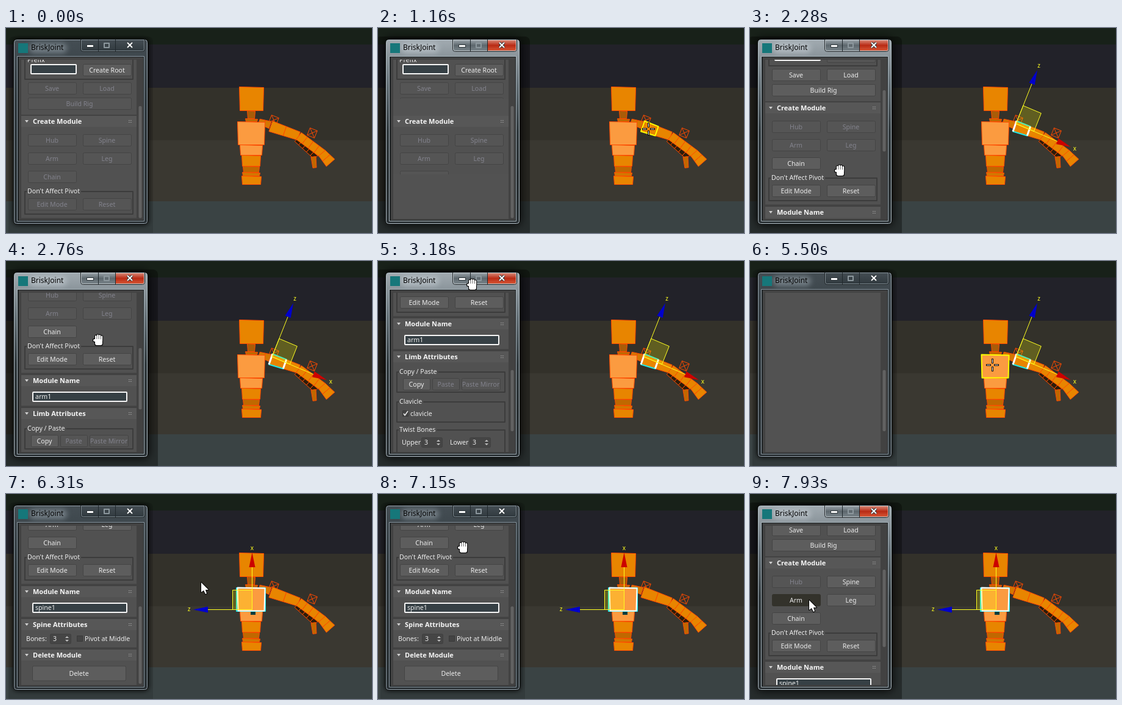
An HTML page with a canvas for the animation above (8 s loop, 600 by 336 pixels).

```html
<!DOCTYPE html>
<html lang="en">
<head>
<meta charset="utf-8">
<title>Rig panel</title>
<style>
html, body { margin: 0; width: 100%; height: 100%; overflow: hidden; background: #182119; }
canvas { display: block; width: 600px; height: 336px; }
</style>
</head>
<body>
<canvas id="stage" width="600" height="336"></canvas>
<script>
const ctx = document.getElementById('stage').getContext('2d');
const LOOP = 8000, STEP = 60;
const FONT = '"Noto Sans", "Open Sans", sans-serif';

// Drawing helpers
function rect(x, y, w, h, fill) { ctx.fillStyle = fill; ctx.fillRect(x, y, w, h); }
function frame(x, y, w, h, color, width = 1) {
  ctx.strokeStyle = color; ctx.lineWidth = width;
  ctx.strokeRect(x + width / 2, y + width / 2, w - width, h - width);
}
function round(x, y, w, h, r, fill, stroke) {
  ctx.beginPath(); ctx.roundRect(x, y, w, h, r);
  if (fill) { ctx.fillStyle = fill; ctx.fill(); }
  if (stroke) { ctx.strokeStyle = stroke; ctx.lineWidth = 1; ctx.stroke(); }
}
function text(s, x, y, color = '#ececec', align = 'left', style = '10.6px') {
  ctx.font = `${style} ${FONT}`; ctx.textAlign = align; ctx.textBaseline = 'middle';
  ctx.fillStyle = color; ctx.fillText(s, x, y);
}
function path(points, closed = true) {
  const p = new Path2D();
  points.forEach(([x, y]) => p.lineTo(x, y));
  if (closed) p.closePath();
  return p;
}
function paint(p, fill, stroke, width = 1) {
  if (fill) { ctx.fillStyle = fill; ctx.fill(p); }
  if (stroke) { ctx.strokeStyle = stroke; ctx.lineWidth = width; ctx.stroke(p); }
}
const line = (a, b, color, width) => paint(path([a, b], false), null, color, width);
const triangle = (x, y, w, h, color) => paint(path([[x - w, y], [x + w, y], [x, y + h]]), color);
function gradient(y0, y1, ...colors) {
  const g = ctx.createLinearGradient(0, y0, 0, y1);
  colors.forEach((c, i) => g.addColorStop(i / (colors.length - 1), c));
  return g;
}
const mix = (a, b, k) => a.map((v, i) => v + (b[i] - v) * k);
const along = ([x, y], [dx, dy], d) => [x + dx * d, y + dy * d];
function unit(a, b) {
  const d = Math.hypot(b[0] - a[0], b[1] - a[1]);
  return [(b[0] - a[0]) / d, (b[1] - a[1]) / d];
}

// Pointer strokes: start, end, destination; the pointer rests in between
const strokes = [
  [60, 480, 405, 115], [480, 840, 443, 165], [1480, 2160, 146, 259], [2160, 3180, 154, 38],
  [3560, 4340, 495, 225], [4720, 5500, 397, 170], [5950, 7150, 139, 87], [7150, 7570, 142, 211],
  [7630, 7930, 97, 174]
];
function pointerAt(t) {
  let pos = [516, 234];
  for (const [start, end, ...goal] of strokes) {
    if (t < start) break;
    const passed = t >= end ? end - start : Math.floor((t - start) / STEP) * STEP;
    pos = mix(pos, goal, passed / (end - start));
  }
  return pos;
}

// Character: a stack of blocks and a chain of tapered limbs
const ORANGE = '#e88500', LIGHT = '#fb9b40', DARK = '#c06800', SHADE = '#2c1c0a', LINE = '#ff4a00';
const parts = [];
const addPart = (name, fill, corners) => parts.push({ name, fill, corners, shape: path(corners) });

function limb(name, from, to, startWidth, endWidth, count, fill) {
  const [dx, dy] = unit(from, to), normal = [dy, -dx];
  const edge = k => {
    const p = mix(from, to, k), w = startWidth + (endWidth - startWidth) * k;
    return [along(p, normal, w), along(p, normal, -w)];
  };
  for (let i = 0; i < count; i++) {
    const [a, b] = edge(i / count), [c, d] = edge((i + 1) / count);
    addPart(name + i, fill, [a, c, d, b]);
  }
}
limb('clavicle', [415, 153], [433, 159], 4, 6, 2, '#d47700');
limb('under', [476, 183], [508, 212], 4, 4, 5, SHADE);
limb('thumb', [504, 211], [506, 229], 4, 3, 1, DARK);
limb('upper', [434, 161], [480, 177], 9, 7, 2, ORANGE);
limb('fore', [480, 177], [519, 206], 7, 7, 4, ORANGE);
limb('hand', [518, 205], [532, 221], 7, 9, 2, ORANGE);

let blockTop = 96.5;
for (const [name, w, h, fill] of [
  ['head', 40, 39, ORANGE], ['neck', 13, 13, '#a95c08'], ['collar', 20, 5, DARK],
  ['chest', 45, 38, LIGHT], ['waist', 37, 17, LIGHT], ['hips', 31, 18, ORANGE],
  ['pelvis', 27, 10, DARK], ['seat', 29, 6, '#d47700'], ['base', 32, 14, ORANGE]
]) {
  const left = Math.round(401.5 - w / 2) + .5, right = left + w, bottom = blockTop + h;
  addPart(name, fill, [[left, blockTop], [right, blockTop + 1], [right - 1, bottom], [left + 1, bottom]]);
  blockTop = bottom;
}
const partNamed = name => parts.find(p => p.name === name);

function gimbal(x, y) {
  const corners = [0, 1, 2, 3].map(i => along([x, y], [Math.cos(i * 1.57 - .4), Math.sin(i * 1.57 - .4)], 9));
  corners.forEach((a, i) => corners.slice(i + 1).forEach(b => line(a, b, LINE)));
}
function drawFigure(hovered) {
  ctx.lineJoin = 'round';
  gimbal(439, 151); gimbal(502, 172);
  parts.forEach(p => paint(p.shape, p.fill, LINE));
  if (hovered) paint(hovered.shape, null, '#ffff00', 2);
}

// Transform gizmo
const YELLOW = '#ffff20';
function gizmo(origin, xTip, zTip) {
  const u = unit(origin, xTip), v = unit(origin, zTip), size = 32;
  const a = along(origin, u, size), b = along(origin, v, size);
  paint(path([origin, a, along(a, v, size), b]), 'rgba(255,255,0,.22)', YELLOW);
  for (const [name, tip, dir, color] of [['x', xTip, u, '#cc0000'], ['z', zTip, v, '#0000cc']]) {
    const base = along(tip, dir, -24), normal = [-dir[1], dir[0]];
    line(origin, base, YELLOW);
    paint(path([along(base, normal, 5), tip, along(base, normal, -5)]), color);
    text(name, ...along(tip, dir, 7), YELLOW, 'center', '10px');
  }
}
function drawSelection(kind) {
  if (kind === 'arm') {
    const { shape, corners: [a, b, c, d] } = partNamed('upper0');
    paint(shape, null, '#20e8e8', 2);
    line(a, d, '#fff', 3); line(b, c, '#fff', 3);
    gizmo([436, 157], [526, 195], [471, 69]);
  } else {
    frame(377, 153, 49, 40, '#20e8e8', 2);
    paint(partNamed('chest').shape, null, '#fff', 2);
    rect(401, 193, 8, 5, '#063c3c');
    gizmo([403.5, 189.5], [403.5, 96], [307, 189.5]);
  }
}

// Panel widgets; y is the vertical centre of a row
const PANEL = '#515151';
const MODULES = ['Hub', 'Spine', 'Arm', 'Leg', 'Chain'];
function isEnabled(label, kind) {
  if (label.startsWith('Paste')) return false;
  if (label === 'Create Root') return kind === 'none';
  if (kind === 'none') return false;
  const i = MODULES.indexOf(label);
  return i < 0 || label === 'Chain' || (kind === 'spine' && i > 0);
}
function button(label, x, y, w, state, h = 20) {
  const on = isEnabled(label, state.kind), pressed = label === 'Arm' && state.overArm;
  round(x + .5, y - h / 2 + .5, w - 1, h - 1, 2,
    pressed ? '#33322b' : on ? '#5d5d5d' : '#555', pressed ? '#33322b' : '#444');
  text(label, x + w / 2 - .5, y + .5, on ? '#ececec' : '#83838d', 'center');
}
function buttonGrid(labels, y, state) {
  labels.forEach((label, i) => button(label, 36 + i % 2 * 90, y + (i >> 1) * 30, 80, state));
}
function rollout(title, top, height) {
  rect(25, top, 189, height, PANEL);
  rect(25, top, 189, 18, '#575757');
  rect(25, top + height - 1, 189, 1, '#474747');
  triangle(34, top + 7, 3, 4, '#d0d0d0');
  text(title, 44, top + 9.5, '#f6f6f6', 'left', 'bold 11px');
  for (let i = 0; i < 6; i++) rect(201 + i % 3 * 2, top + 7 + (i > 2) * 3, 1, 1, '#aaa');
}
function group(label, top, height) {
  frame(30, top, 179, height, '#3c3c3c', 2);
  ctx.font = `10.6px ${FONT}`;
  rect(34, top - 4, ctx.measureText(label).width + 3, 8, PANEL);
  text(label, 35, top + .5);
}
function field(x, y, w, value) {
  round(x, y - 8, w, 17, 2, '#f4f4f4');
  rect(x + 2, y - 6, w - 4, 13, '#364045');
  text(value, x + 5, y + .5);
}
function spinner(label, x, y, gap) {
  text(label, x, y + .5);
  round(x + gap + .5, y - 7.5, 34, 16, 2, '#454545', '#404040');
  text('3', x + gap + 5, y + .5);
  triangle(x + gap + 28, y - 1, 3, -3, '#c0c0c0');
  triangle(x + gap + 28, y + 2, 3, 3, '#c0c0c0');
}
function checkbox(x, y, label, checked) {
  rect(x, y - 5, 10, 10, '#434343'); frame(x, y - 5, 10, 10, '#393939');
  if (checked) paint(path([[x + 2, y], [x + 4, y + 3], [x + 9, y - 4]], false), null, '#e8e8e8', 1.6);
  text(label, x + 13, y + .5);
}

// Sections flow downwards; each body receives the top of its section
const sections = {
  create: ['Create Module', 168, (y, state) => {
    buttonGrid(MODULES, y + 40, state);
    group("Don't Affect Pivot", y + 123, 39);
    buttonGrid(['Edit Mode', 'Reset'], y + 145, state);
  }],
  name: ['Module Name', 51, (y, state) => field(43, y + 35, 156, state.kind + '1')],
  limb: ['Limb Attributes', 250, (y, state) => {
    group('Copy / Paste', y + 33, 35);
    ['Copy', 'Paste', 'Paste Mirror'].forEach((s, i) => button(s, 41 + i * 48, y + 54, i < 2 ? 45 : 64, state));
    group('Clavicle', y + 82, 35);
    checkbox(40, y + 102, 'clavicle', true);
    group('Twist Bones', y + 128, 40);
    spinner('Upper', 39, y + 149, 32);
    spinner('Lower', 118, y + 149, 32);
  }],
  spine: ['Spine Attributes', 47, y => {
    spinner('Bones:', 33, y + 32, 39);
    checkbox(116, y + 32, 'Pivot at Middle', false);
  }],
  remove: ['Delete Module', 59, (y, state) => button('Delete', 43, y + 39, 154, state, 25)]
};
const layouts = {
  none: ['create'], arm: ['create', 'name', 'limb'], spine: ['create', 'name', 'spine', 'remove']
};
function drawRollouts(state) {
  rect(25, 0, 189, 142, PANEL);
  frame(30, 40, 179, 45, '#3c3c3c', 2);
  text('Prefix', 35, 53);
  field(40, 67, 76, '');
  button('Create Root', 126, 69, 80, state);
  buttonGrid(['Save', 'Load'], 99, state);
  button('Build Rig', 36, 124, 170, state);
  let top = 144;
  for (const key of layouts[state.kind]) {
    const [title, height, body] = sections[key];
    rollout(title, top, height);
    body(top, state);
    top += height + 3;
  }
}
const VIEW = { top: 52, height: 261 }, HIDDEN_ABOVE = 108;
function drawScrollbar({ kind, scroll }) {
  const total = layouts[kind].reduce((sum, key) => sum + sections[key][1] + 3, 144 - VIEW.top + HIDDEN_ABOVE);
  const ratio = VIEW.height / total;
  round(217.5, VIEW.top + (scroll + HIDDEN_ABOVE) * ratio, 5, VIEW.height * ratio, 2, '#626262');
}
function drawContent(state) {
  rect(24, VIEW.top, 199, VIEW.height + 1, '#424242');
  ctx.save();
  ctx.beginPath();
  if (state.partial || state.blank) rect(25, VIEW.top, 189, VIEW.height, '#525252');
  if (state.partial) { ctx.rect(24, 52, 191, 64); ctx.rect(24, 144, 191, 96); }
  else ctx.rect(24, VIEW.top, 191, VIEW.height);
  ctx.clip();
  ctx.translate(0, -state.scroll);
  if (!state.blank) drawRollouts(state);
  ctx.restore();
  drawScrollbar(state);
}

function drawWindow(state) {
  const { active } = state, reach = active ? 17 : 9;
  round(13 - reach, 14, 219 + reach * 2, 340, 8, active ? 'rgba(0,0,0,.35)' : 'rgba(0,0,0,.12)');
  ctx.save();
  ctx.shadowColor = '#000'; ctx.shadowBlur = active ? 16 : 8;
  round(12, 18, 221, 304, 6, '#0b0d0c');
  ctx.restore();
  round(13.5, 19.5, 218, 301, 4,
    active ? gradient(18, 320, '#a3acb2', '#626e75', '#30393d', '#282f32', '#2a3135')
           : gradient(18, 320, '#454e54', '#2f393e', '#2a3236', '#2a3135'),
    active ? '#b4c0c8' : '#98a4ae');

  // Glass highlight behind the caption
  ctx.save();
  ctx.filter = 'blur(4px)';
  round(38, 25, 62, 16, 8, active ? 'rgba(205,214,220,.5)' : 'rgba(150,162,170,.6)');
  ctx.restore();
  rect(20, 25, 16, 16, '#16777a');
  text('BriskJoint', 41, 33, '#050505', 'left', '12px');

  const grey = active ? gradient(19, 38, '#a0a9af', '#5d676d', '#7b868c') : gradient(19, 38, '#454e54', '#30393e');
  round(122.5, 18.5, 105, 20, [0, 0, 4, 4], grey, '#1b2023');
  if (active) round(180, 19, 47, 19, [0, 0, 4, 0], gradient(19, 38, '#dc9180', '#b92b15', '#d95a38'));
  round(123.5, 19.5, 103, 18, [0, 0, 3, 3], null, active ? '#c0c8cc' : '#828e95');
  rect(151, 19, 1, 19, '#20282c'); rect(179, 19, 1, 19, '#20282c');
  rect(132, 27, 12, 5, '#30383c'); rect(133, 28, 10, 3, '#fff');
  frame(160, 24, 10, 9, '#8c979d', 2);
  for (const [color, width] of [['#30383c', 4], ['#fff', 2]]) {
    line([199, 24], [207, 32], color, width); line([207, 24], [199, 32], color, width);
  }
  frame(18, 46, 209, 271, active ? '#a9b4bb' : '#8e9aa3');
  rect(19, 47, 207, 269, '#1d2224');
  rect(21, 48, 204, 267, '#434343');
  drawContent(state);
}

// Pointers; outlined shapes are painted black and grown, then white
const pointers = {
  cross(grow) {
    for (const start of [-9, 4]) {
      ctx.fillRect(start - grow, -grow, 6 + grow * 2, 1 + grow * 2);
      ctx.fillRect(-grow, start - grow, 1 + grow * 2, 6 + grow * 2);
    }
  },
  hand(grow) {
    ctx.beginPath();
    for (let i = 0; i < 4; i++) {
      const top = -9 + Math.abs(i - 1.4) * 1.5;
      ctx.roundRect(-5 + i * 3.2 - grow, top - grow, 2.6 + grow * 2, 10 + grow * 2, 1.3 + grow);
    }
    ctx.roundRect(-8 - grow, -1 - grow, 6 + grow * 2, 4 + grow * 2, 2);
    ctx.roundRect(-5 - grow, -1 - grow, 12 + grow * 2, 10 + grow * 2, 3);
    ctx.fill();
  },
  arrow(grow) {
    const shape = path([[0, 0], [0, 16], [4, 13], [7, 19], [9, 18], [7, 12], [12, 12]]);
    paint(shape, ctx.fillStyle, grow && '#000', 2);
  }
};
function drawPointer(kind, [x, y]) {
  ctx.save();
  ctx.translate(Math.round(x), Math.round(y));
  ctx.fillStyle = '#000'; pointers[kind](1);
  ctx.fillStyle = '#fff'; pointers[kind](0);
  ctx.restore();
}

const clamp = (v, low, high) => Math.min(high, Math.max(low, v));
const draggedY = (t, start, end) => pointerAt(clamp(t, start, end))[1];
function stateAt(t) {
  const within = (a, b) => t >= a && t < b;
  const kind = t < 1280 ? 'none' : t < 5560 ? 'arm' : 'spine';
  const scroll = kind === 'none' ? 0
    : kind === 'arm' ? Math.max(0, 22 + (233 - draggedY(t, 2160, 3180)) * 1.02)
    : 251 - draggedY(t, 7150, 7570);
  return {
    kind,
    scroll: Math.round(scroll),
    active: within(1160, 1220) || within(2160, 4460) || within(5440, 5500) || t >= 7270,
    partial: within(1160, 1220),
    blank: within(1220, 1280) || within(5440, 5560),
    overArm: t >= 7810
  };
}

function draw(t) {
  const state = stateAt(t), [x, y] = pointerAt(t);
  const under = x > 240 && parts.findLast(p => ctx.isPointInPath(p.shape, x, y));
  const selected = { arm: 'upper0', spine: 'chest' }[state.kind];

  for (const [top, color] of [[0, '#182119'], [27, '#222229'], [98, '#33312a'], [184, '#3a3831'], [284, '#3a4344']])
    rect(0, top, 600, 336 - top, color);
  drawFigure(t >= 60 && under && under.name !== selected ? under : null);
  if (state.kind !== 'none') drawSelection(state.kind);
  drawWindow(state);

  const inPanel = x > 24 && x < 223 && y > VIEW.top;
  const dragging = t >= 2160 && t < 3560;
  const pointer = under ? 'cross' : dragging || (inPanel && t < 7630) ? 'hand' : 'arrow';
  if (t >= 60) drawPointer(pointer, [x, y]);
}

function tick() {
  draw(performance.now() % LOOP);
  requestAnimationFrame(tick);
}
tick();
</script>
</body>
</html>
```
